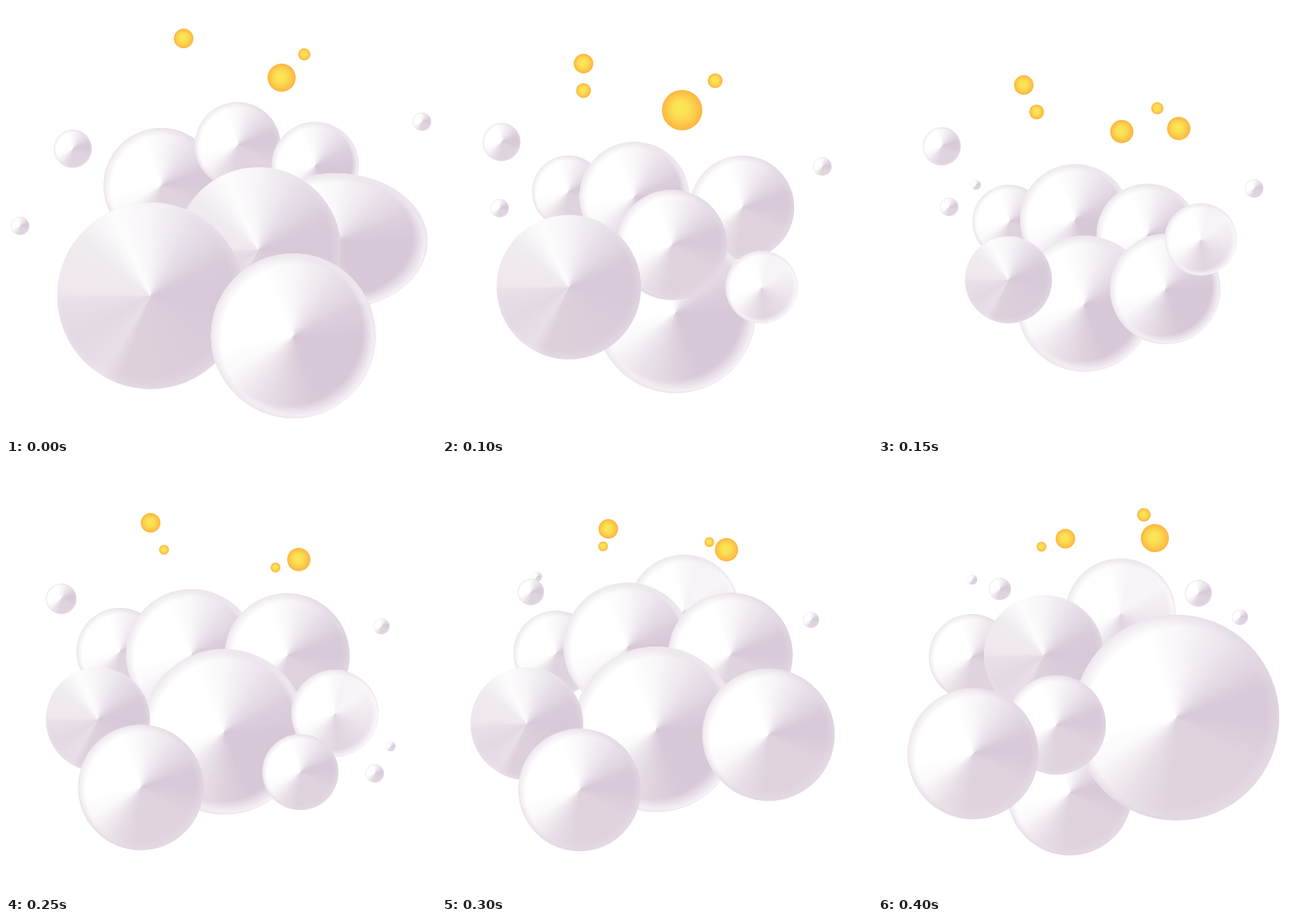
An HTML page with a canvas for the animation above (0.45 s loop, 702 by 702 pixels).

```html
<!DOCTYPE html>
<html lang="en">
<head>
<meta charset="utf-8">
<title>Bubble cloud</title>
<style>
  html, body { margin: 0; width: 100%; height: 100%; overflow: hidden; background: #fff; }
  canvas { display: block; width: 100vmin; height: 100vmin; }
</style>
</head>
<body>
<canvas id="stage" width="702" height="702"></canvas>
<script>
const ctx = document.getElementById('stage').getContext('2d');
const STEP = 50, STEPS = 9;

// Shading around each bubble: [degrees clockwise from east, colour]
const SHADES = {
  soft: [[0, '#d7c8d8'], [70, '#d8c9d8'], [95, '#e0d4df'], [125, '#ece5ec'], [150, '#fbf9fb'],
         [170, '#fff'], [245, '#fff'], [270, '#f9f7f9'], [300, '#ece5ed'], [335, '#dccfdd'], [360, '#d7c8d8']],
  low: [[0, '#d8cad9'], [30, '#dfd3de'], [95, '#dfd3dd'], [120, '#e8dfe7'], [150, '#fbf9fb'],
        [170, '#fff'], [250, '#fff'], [275, '#f8f5f8'], [305, '#eae3eb'], [342, '#d8cad9'], [360, '#d8cad9']],
  facet: [[0, '#d7c9d8'], [40, '#dacddb'], [110, '#ddd1db'], [122, '#e9dfe8'], [150, '#e3d9e3'],
          [176, '#e8dfe7'], [183, '#f0e7ee'], [218, '#efebef'], [246, '#fdfcfd'], [270, '#f7f4f7'],
          [300, '#e8e1ea'], [335, '#d9ccda'], [360, '#d7c9d8']],
  pale: [[0, '#f0eaf0'], [45, '#e6dde6'], [85, '#dfd4df'], [115, '#eae2ea'], [145, '#faf8fa'],
         [165, '#fff'], [255, '#fefefe'], [285, '#f6f3f6'], [320, '#f8f5f8'], [360, '#f0eaf0']]
};

// Bubbles from back to front: [x, y, radius, shade = low, height ratio = 1]
const spread = {
  gold1: [290, 53, 16], gold4: [487, 79, 10], gold3: [450, 117, 23],
  drop1: [109, 233, 31], drop2: [23, 359, 15], drop3: [679, 189, 15],
  left: [253, 293, 94], top: [378, 227, 70], right: [505, 260, 71, 'soft'],
  side: [538, 384, 150, 'soft', .74], core: [412, 398, 135, 'facet'],
  cheek: [236, 473, 152.5, 'facet'], front: [469, 538.5, 134.5, 'soft']
};
const gather = {
  gold1: [231, 94, 16], gold2: [231, 138, 12], gold4: [446, 122, 12], gold3: [392, 170, 33],
  drop1: [97, 222, 31], drop2: [94, 330, 15], drop3: [621, 262, 15],
  left: [206, 303, 59], top: [314, 311, 89.5, 'soft'], right: [490, 329, 85],
  core: [381, 501, 131, 'soft'], front: [375, 390, 90],
  cheek: [207, 459, 118, 'facet'], side: [522, 459, 59, 'pale']
};
const tight = {
  gold1: [238, 129, 16], gold2: [259, 173, 12], gold3: [398, 205, 19],
  gold4: [456, 167, 10], gold5: [491, 200, 19],
  drop1: [104, 229, 31], drop4: [160, 292, 8], drop2: [116, 328, 15], drop3: [614, 298, 15],
  left: [214, 352, 60], top: [322, 348, 90, 'soft'], right: [440, 373, 83, 'soft'],
  core: [337, 486, 111, 'soft'], cheek: [213, 447, 71, 'facet'],
  front: [469, 462, 90, 'soft'], side: [527, 381, 59, 'pale']
};
const open = {
  gold1: [236, 96, 16], gold2: [258, 140, 8], gold4: [440, 169, 8], gold5: [478, 156, 19],
  drop1: [90, 220, 25], drop3: [613, 265, 13], drop5: [628, 461, 8], drop6: [602, 505, 15],
  left: [186, 306, 71], top: [303, 311, 107, 'soft'], right: [459, 313, 102],
  core: [356, 437, 135, 'soft'], side: [537, 407, 71, 'pale'],
  cheek: [150, 417, 85, 'facet'], base: [220, 528, 102.5], front: [480.5, 503, 62]
};
const billow = {
  gold2: [268, 129, 8], gold1: [307, 116, 16], gold4: [433, 86, 8], gold5: [451, 124, 19],
  drop4: [155, 184, 8], drop1: [200, 198, 18], drop3: [592, 244, 13],
  back: [395, 238, 90, 'pale'], left: [186, 312, 68], top: [303, 285, 102, 'soft'],
  right: [483, 310, 101], core: [343, 429, 135, 'soft'],
  cheek: [127, 431, 99, 'facet'], base: [229, 536, 97.5], side: [529, 477, 145]
};
const swell = {
  gold2: [267, 135, 8], gold1: [306, 122, 16], gold4: [434, 83, 11], gold5: [452, 121, 23],
  drop4: [154, 189, 8], drop1: [199, 204, 18], drop7: [523, 211, 22], drop3: [591, 250, 13],
  back: [396, 244, 90, 'pale'], left: [153, 315, 70], top: [271, 312, 98, 'facet'],
  core: [313, 537, 102], side: [487, 414, 168], base: [291, 426, 81], cheek: [155, 473, 107]
};

function between(from, to) {
  const mid = {};
  for (const key in to) {
    const [x, y, r, shade] = to[key], a = from[key] || to[key];
    mid[key] = [(a[0] + x) / 2, (a[1] + y) / 2, (a[2] + r) / 2, shade];
  }
  return mid;
}

const poses = [spread, between(spread, gather), gather, tight, between(tight, open),
               open, between(open, billow), billow, swell];

function withStops(gradient, stops) {
  for (const [at, colour] of stops) gradient.addColorStop(at, colour);
  return gradient;
}

function fillUnit(style) {
  ctx.beginPath();
  ctx.arc(0, 0, 1, 0, Math.PI * 2);
  ctx.fillStyle = style;
  ctx.fill();
}

// Glow along the edge, thickest on the side away from the shift.
function rim(shift, inner, rgb, strength) {
  fillUnit(withStops(ctx.createRadialGradient(shift, shift, inner, 0, 0, 1),
    [[0, `rgba(${rgb},0)`], [1, `rgba(${rgb},${strength})`]]));
}

function drawBubble(key, [x, y, r, shade = 'low', ratio = 1]) {
  ctx.save();
  ctx.translate(x, y);
  ctx.scale(r, r * ratio);
  if (key.startsWith('gold')) {
    fillUnit(withStops(ctx.createRadialGradient(-.12, -.12, 0, 0, 0, 1),
      [[0, '#f9e956'], [.4, '#fae052'], [.75, '#fcc84a'], [1, '#feb43f']]));
  } else {
    fillUnit(withStops(ctx.createConicGradient(0, 0, 0),
      SHADES[shade].map(([deg, colour]) => [deg / 360, colour])));
    if (shade === 'soft' || shade === 'pale') rim(-.06, .9, '255,253,255', .85);
    else rim(-.05, .92, '240,232,240', .35);
    if (shade !== 'facet') rim(.05, .92, '221,208,221', .5);
  }
  ctx.restore();
}

function render(now) {
  const pose = poses[Math.floor(now / STEP) % STEPS];
  ctx.fillStyle = '#fff';
  ctx.fillRect(0, 0, 702, 702);
  for (const key in pose) drawBubble(key, pose[key]);
}

let start;
function tick(now) {
  start ??= now;
  render(now - start);
  requestAnimationFrame(tick);
}
render(0);
requestAnimationFrame(tick);
</script>
</body>
</html>
```
